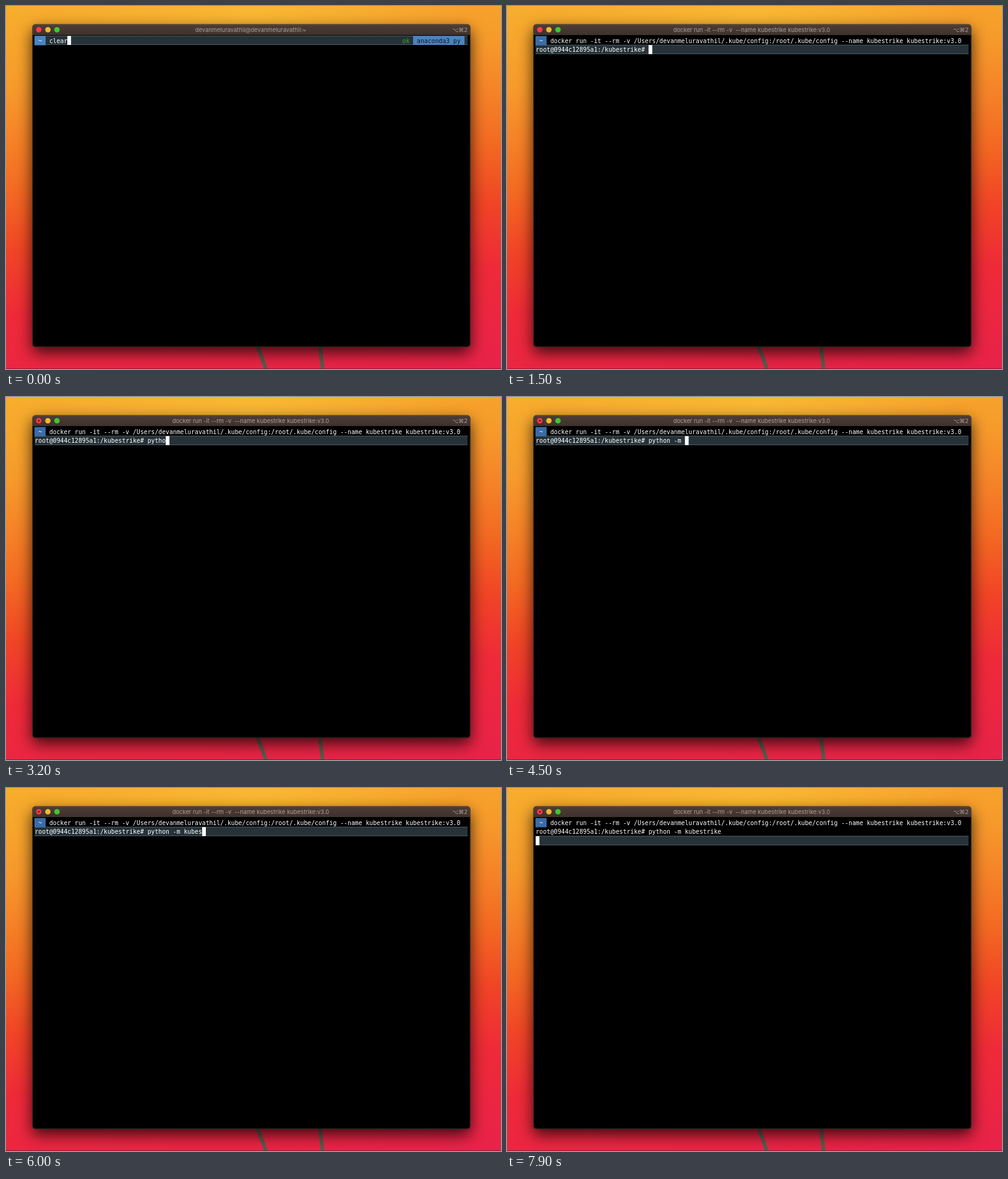
Animation of 800 by 587 pixels, one loop 8 s. Source, as an HTML page:

```html
<!DOCTYPE html>
<html lang="en">
<head>
<meta charset="utf-8">
<title>Terminal</title>
<style>
  html, body { margin: 0; width: 100%; height: 100%; overflow: hidden; background: #f04426; }
  svg { display: block; }
  text { white-space: pre; font: 9.77px "DejaVu Sans Mono", monospace; fill: #fff; }
  .bar { font: 9.4px Inter, sans-serif; fill: #aaa19d; }
  .keys { font: 9px "DejaVu Sans", sans-serif; fill: #aaa19d; }
  .window { filter: drop-shadow(0 9px 12px rgba(0, 0, 0, .75)); }
</style>
</head>
<body>
<svg width="800" height="587" viewBox="0 0 800 587">
  <defs>
    <linearGradient id="sky" gradientUnits="userSpaceOnUse" x1="0" y1="0" x2="66" y2="660">
      <stop offset="0" stop-color="#f7ae2d"/>
      <stop offset=".2" stop-color="#f69a2b"/>
      <stop offset=".32" stop-color="#f58428"/>
      <stop offset=".45" stop-color="#f36a22"/>
      <stop offset=".6" stop-color="#f04426"/>
      <stop offset=".75" stop-color="#ee2a38"/>
      <stop offset="1" stop-color="#e8224a"/>
    </linearGradient>
    <radialGradient id="glow" gradientUnits="userSpaceOnUse" cx="400" cy="0" r="330">
      <stop offset="0" stop-color="#fac337" stop-opacity=".6"/>
      <stop offset="1" stop-color="#fac337" stop-opacity="0"/>
    </radialGradient>
    <linearGradient id="titlebar" x2="0" y2="1">
      <stop offset="0" stop-color="#4d3c36"/>
      <stop offset="1" stop-color="#3f312d"/>
    </linearGradient>
  </defs>

  <rect width="800" height="587" fill="url(#sky)"/>
  <rect width="800" height="587" fill="url(#glow)"/>
  <g fill="none" stroke="#5c5a4b" stroke-width="6">
    <path d="M402 540Q411 560 421 590"/>
    <path d="M506 540Q509 560 512 590"/>
  </g>
  <rect y="586" width="800" height="1" fill="#401018" opacity=".5"/>

  <rect class="window" x="42.5" y="29.5" width="708" height="522" rx="5"/>
  <path d="M43 47V35Q43 30 48 30H745Q750 30 750 35V47Z" fill="url(#titlebar)"/>
  <rect x="43" y="30" width="707" height="521" rx="5" fill="none" stroke="#8c7a70" stroke-opacity=".35"/>
  <circle cx="53" cy="38.3" r="4.4" fill="#fc3b47"/>
  <circle id="busy" cx="53" cy="38.3" r="1.4" fill="#6b0a10"/>
  <circle cx="67.7" cy="38.3" r="4.4" fill="#eebb2f"/>
  <circle cx="82.4" cy="38.3" r="4.4" fill="#3fc72f"/>
  <text id="title" class="bar" x="395.5" y="41.7" text-anchor="middle"></text>
  <text class="keys" x="746" y="41.5" text-anchor="end">⌥⌘2</text>

  <g id="guide">
    <rect x="46" y="48" width="700" height="15" fill="#263238"/>
    <path d="M46 48.5H746M46 62.5H746" stroke="#475b61"/>
  </g>
  <rect id="home" x="46" y="48.5" width="18" height="15"/>
  <text x="52.3" y="59.6">~</text>
  <g id="status">
    <text x="640.5" y="59.6" style="fill:#3fa81c">ok</text>
    <rect x="658" y="48.5" width="83" height="14.5" fill="#4a84c4"/>
    <text x="664" y="59.6" style="fill:#0c1420">anaconda3 py</text>
  </g>
  <text id="line0" x="69.9" y="59.6"></text>
  <text id="line1" x="46.4" y="74.3"></text>
  <rect id="cursor" y="48.5" width="6" height="14.5" fill="#fff"/>
</svg>
<script>
const LOOP = 8000, CHAR = 5.882, ROW = 14.75;
const RECALL = 400, RUN = 900, SHELL = 1200, BUSY = 2000, ENTER = 7500;
const user = "devanmeluravathil";
const image = "--name kubestrike kubestrike:v3.0";
const docker = `docker run -it --rm -v /Users/${user}/.kube/config:/root/.kube/config ${image}`;
const prompt = "root@0944c12895a1:/kubestrike# ";
const typed = "python -m kubestrike";
// [time, characters typed]
const pace = [[1900, 0], [3100, 5], [4450, 10], [5900, 15], [7000, 20]];

const $ = id => document.getElementById(id);
const show = (id, on) => $(id).setAttribute("visibility", on ? "visible" : "hidden");
const write = (id, s) => { if ($(id).textContent !== s) $(id).textContent = s; };

function typedCount(t) {
  if (t < pace[0][0]) return 0;
  for (let i = 1; i < pace.length; i++) {
    const [t0, n0] = pace[i - 1], [t1, n1] = pace[i];
    if (t < t1) return Math.floor(n0 + (n1 - n0) * (t - t0) / (t1 - t0));
  }
  return typed.length;
}

function draw(t) {
  const running = t >= RUN;
  const first = t < RECALL ? "clear" : docker;
  const second = t < SHELL ? "" : prompt + typed.slice(0, typedCount(t));
  const row = !running ? 0 : t < ENTER ? 1 : 2;
  const x = [69.7 + first.length * CHAR, 46.4 + second.length * CHAR, 46.4][row];

  write("title", running ? `docker run -it --rm -v  ${image}` : `${user}@${user}:~`);
  write("line0", first);
  write("line1", second);
  show("status", t < RECALL);
  show("busy", t >= BUSY);
  $("home").setAttribute("fill", running ? "#3a6ca8" : "#4a84c4");
  $("guide").setAttribute("transform", `translate(0 ${row * ROW})`);
  $("cursor").setAttribute("transform", `translate(${x} ${row * ROW})`);
}

function tick() {
  draw(performance.now() % LOOP);
  requestAnimationFrame(tick);
}
tick();
</script>
</body>
</html>
```
